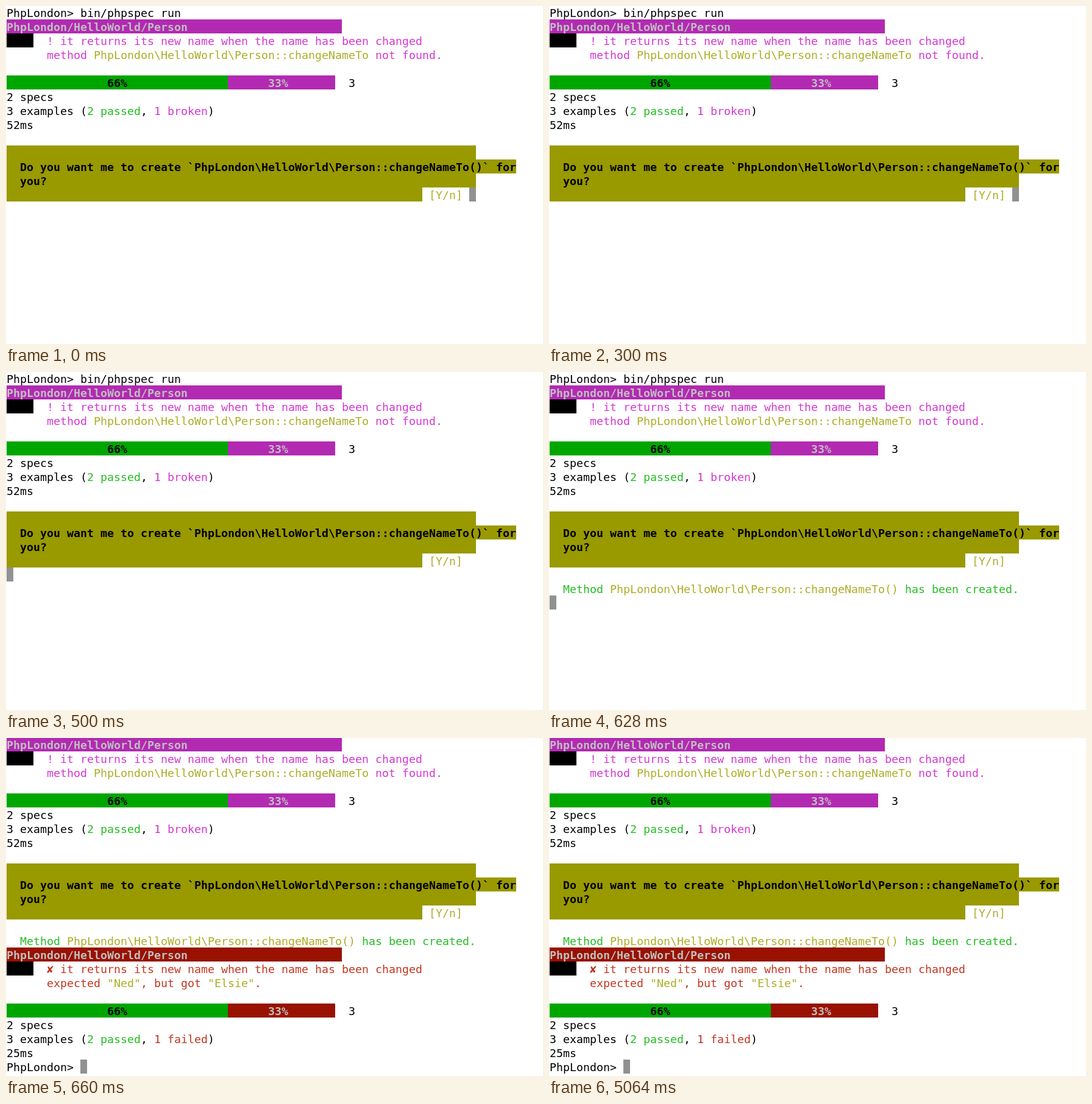
An HTML page with a canvas that plays this animation: 881 by 555 pixels, repeating every 8000 ms.

```html
<!DOCTYPE html>
<html lang="en">
<head>
<meta charset="utf-8">
<title>Terminal</title>
<style>
html, body { margin: 0; width: 100%; height: 100%; overflow: hidden; background: #fff; }
canvas { display: block; }
</style>
</head>
<body>
<canvas id="term" width="881" height="555"></canvas>
<script>
const ctx = document.getElementById('term').getContext('2d');
const CELL = 11, ROW = 23, LOOP = 8000;
const FONT = '18.27px "DejaVu Sans Mono", monospace';
const BLACK = '#000', GREY = '#bfbfbf', CURSOR = '#919191';
const GREEN = '#25bc24', YELLOW = '#adad27', MAGENTA = '#d338d3', RED = '#c23621';
const BG = { green: '#00a600', yellow: '#999900', magenta: '#b22ab2', red: '#991100' };
const CLASS = 'PhpLondon\\HelloWorld\\Person::changeNameTo';

function fill(row, col, cols, color, rows = 1) {
  ctx.fillStyle = color;
  ctx.fillRect(1 + col * CELL, row * ROW - 1, cols * CELL, rows * ROW);
}

// Draws on the cell grid and returns the next free column.
function print(row, col, text, color = BLACK, bold = false) {
  ctx.font = (bold ? 'bold ' : '') + FONT;
  ctx.fillStyle = color;
  for (const ch of text) {
    if (ch !== ' ') ctx.fillText(ch, 1 + col * CELL, row * ROW + 18);
    col++;
  }
  return col;
}

function line(row, col, ...runs) {
  for (const [text, color] of runs) col = print(row, col, text, color);
}

function report(row, bg, fg, mark, detail, status, time) {
  fill(row, 0, 50, bg);
  print(row, 0, 'PhpLondon/HelloWorld/Person', GREY, true);
  fill(row + 1, 0, 4, BLACK);
  print(row + 1, 6, mark + ' it returns its new name when the name has been changed', fg);
  line(row + 2, 6, ...detail);
  fill(row + 4, 0, 33, BG.green);
  fill(row + 4, 33, 16, bg);
  print(row + 4, 15, '66%', BLACK, true);
  print(row + 4, 39, '33%', GREY, true);
  print(row + 4, 51, '3');
  print(row + 5, 0, '2 specs');
  line(row + 6, 0, ['3 examples ('], ['2 passed', GREEN], [', '], ['1 ' + status, fg], [')']);
  print(row + 7, 0, time);
}

function question(row) {
  fill(row, 0, 70, BG.yellow, 3);
  fill(row + 1, 70, 6, BG.yellow);
  fill(row + 3, 0, 62, BG.yellow);
  print(row + 1, 2, 'Do you want me to create `' + CLASS + '()` for', BLACK, true);
  print(row + 2, 2, 'you?', BLACK, true);
  print(row + 3, 63, '[Y/n]', YELLOW);
}

function draw(stage) {
  ctx.fillStyle = '#fff';
  ctx.fillRect(0, 0, 881, 555);
  const top = stage === 3 ? 0 : 1;
  if (top) print(0, 0, 'PhpLondon> bin/phpspec run');
  report(top, BG.magenta, MAGENTA, '!',
    [['method ', MAGENTA], [CLASS, YELLOW], [' not found.', MAGENTA]], 'broken', '52ms');
  question(top + 9);
  if (stage >= 2) {
    line(top + 14, 2, ['Method ', GREEN], [CLASS + '()', YELLOW], [' has been created.', GREEN]);
  }
  if (stage === 3) {
    report(15, BG.red, RED, '✘',
      [['expected ', RED], ['"Ned"', YELLOW], [', but got ', RED], ['"Elsie"', YELLOW], ['.', RED]],
      'failed', '25ms');
    print(23, 0, 'PhpLondon>');
  }
  const [row, col] = [[13, 69], [14, 0], [16, 0], [23, 11]][stage];
  fill(row, col, 1, CURSOR);
}

const start = performance.now();
function tick(now) {
  const t = Math.max(0, now - start) % LOOP;
  draw(t < 500 ? 0 : t < 580 ? 1 : t < 660 ? 2 : 3);
  requestAnimationFrame(tick);
}
draw(0);
requestAnimationFrame(tick);
</script>
</body>
</html>
```
